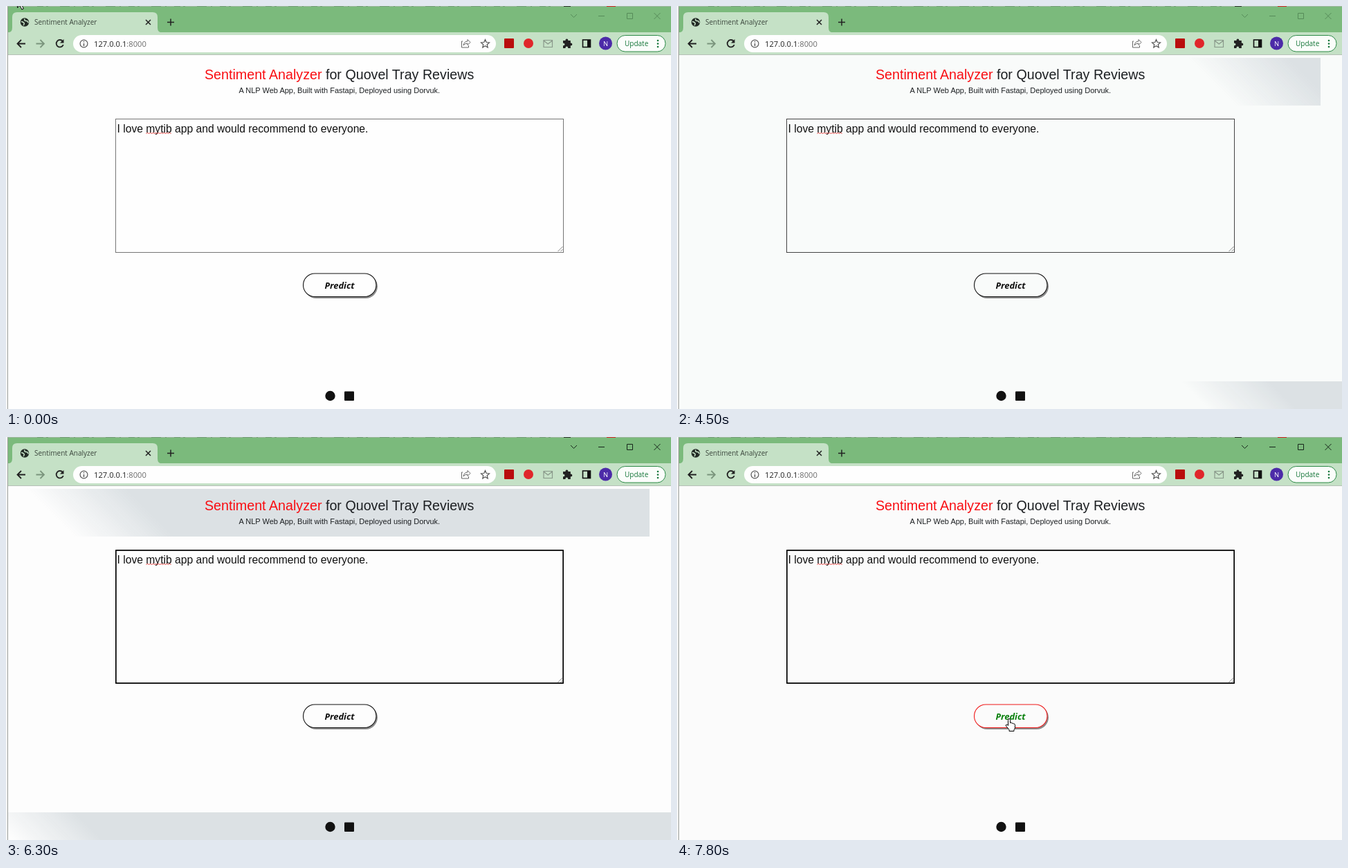
Recreate the animation shown at these times as an HTML page. Size 961 by 583 pixels, loop 8000 ms.

```html
<!DOCTYPE html>
<html lang="en">
<head>
<meta charset="utf-8">
<title>Sentiment Analyzer</title>
<style>
  html, body { margin: 0; width: 100%; height: 100%; overflow: hidden; background: #fefefe; }
  svg { display: block; width: 100%; height: 100%; }
  text { white-space: pre; }
  .page-text { font-family: "Liberation Sans", Arial, sans-serif; fill: #1c1f22; }
  .ui { font-family: "Open Sans", "Noto Sans", sans-serif; }
  .line { fill: none; stroke: #222; stroke-width: 1.2; }
  .thick { stroke-width: 1.8; }

  .page, .controls, .box, .focus, .sweep, .arrow, .idle, .hover {
    animation: 8s linear infinite;
  }

  .page { animation-name: tint; }
  @keyframes tint {
    0%, 33.7% { fill: #fefefe; }
    37.5% { fill: #fdfdfd; }
    47.5% { fill: #fcfdfd; }
    56.2%, 58% { fill: #f9fbfa; }
    62.5%, 75% { fill: #fdfdfd; }
    86.2% { fill: #fcfcfc; }
    97.5%, 100% { fill: #fbfbfb; }
  }

  /* Window gains focus */
  .controls { fill: none; stroke-width: 1; animation-name: activate; animation-timing-function: step-end; }
  @keyframes activate {
    0% { stroke: #568b59; }
    60%, 100% { stroke: #16251a; }
  }
  .focus { fill: none; stroke: #000; stroke-width: 1.7; animation-name: late; animation-timing-function: step-end; }
  @keyframes late {
    0% { opacity: 0; }
    60%, 100% { opacity: 1; }
  }

  .box { fill: none; animation-name: pulse; }
  @keyframes pulse {
    0%, 15% { stroke: #767676; }
    22.5%, 25% { stroke: #444; }
    31.2%, 47.5% { stroke: #767676; }
    56.2%, 100% { stroke: #444; }
  }

  /* Grey band slides in from the right and back out */
  .sweep { animation-name: sweep; animation-timing-function: ease; animation-delay: -4115ms; }
  .head { --out: 1213px; --in: 28px; }
  .foot { --out: 1232px; --in: -30px; }
  @keyframes sweep {
    0%, 62.5%, 100% { transform: translateX(var(--out)); }
    31.25% { transform: translateX(var(--in)); }
  }

  .arrow { animation-name: wander; }
  @keyframes wander {
    0%, 11.2% { transform: translate(16px, -14px); }
    12.5%, 32.5% { transform: translate(16px, -32px); }
    37.5%, 38.6% { transform: translate(53px, -11px); }
    43.7%, 99.9% { transform: translate(60px, -32px); }
    100% { transform: translate(16px, -14px); }
  }

  .idle { animation-name: hide; animation-timing-function: step-end; }
  .hover { animation-name: show; animation-timing-function: step-end; }
  @keyframes hide { 0% { opacity: 1; } 81.25%, 100% { opacity: 0; } }
  @keyframes show { 0% { opacity: 0; } 81.25%, 100% { opacity: 1; } }

  .button text { font: italic 700 13px "Open Sans", "Noto Sans", sans-serif; }
</style>
</head>
<body>
<svg viewBox="0 0 961 583">
  <defs>
    <linearGradient id="headFade" gradientUnits="userSpaceOnUse" x1="0" y1="75" x2="72" y2="3">
      <stop offset="0" stop-color="#dce1e4" stop-opacity="0"/>
      <stop offset="1" stop-color="#dce1e4"/>
    </linearGradient>
    <linearGradient id="footFade" gradientUnits="userSpaceOnUse" x1="0" y1="543" x2="64" y2="479">
      <stop offset="0" stop-color="#dce1e4" stop-opacity="0"/>
      <stop offset="1" stop-color="#dce1e4"/>
    </linearGradient>
    <clipPath id="headClip"><rect x="30" y="75" width="900" height="69"/></clipPath>
    <clipPath id="footClip"><rect x="3" y="543" width="958" height="40"/></clipPath>
  </defs>

  <rect class="page" width="961" height="583"/>

  <!-- Bands -->
  <g clip-path="url(#headClip)">
    <rect class="sweep head" y="75" width="1400" height="69" fill="url(#headFade)"/>
  </g>
  <g clip-path="url(#footClip)">
    <rect class="sweep foot" y="543" width="1400" height="40" fill="url(#footFade)"/>
  </g>

  <!-- Title bar and toolbar -->
  <rect x="2" width="959" height="39" fill="#7bba7c"/>
  <rect x="2" y="38" width="959" height="32" fill="#c5e1c6"/>
  <path d="M2 38.500q7 0 7-7V16q0-7 7-7H212q7 0 7 7V31.500q0 7 7 7V40H2z" fill="#c5e1c6"/>
  <path d="M2 70.500H961" stroke="#b5c0b6"/>
  <path d="M0 .5H961" stroke="#a3b8a4"/>
  <path d="M45 .5H790" stroke="#7d9f80" stroke-dasharray="9 4 3 17 14 6 2 11"/>
  <path d="M806 .5H816" stroke="#333"/>
  <path d="M868 .5H881" stroke="#d8262c"/>
  <rect width="2" height="583" fill="#f4f4f4"/>
  <path d="M2.500 1V583" stroke="#9b9f9b"/>

  <!-- Tab -->
  <circle cx="27" cy="23.500" r="6.200" fill="#222b25"/>
  <path d="M22 22.500q3 .5 4 2t-1 3.500M27 18.500q-1 3 2 3t3 3" fill="none" stroke="#c5e1c6" stroke-width="1.500"/>
  <text class="ui" x="41" y="27" font-size="10" fill="#3b463d">Sentiment Analyzer</text>
  <path class="line" d="M202 20l7 7m0-7l-7 7" style="stroke-width:1.5"/>
  <path class="line" d="M233 23.500h10m-5-5v10" style="stroke-width:1.5"/>

  <g class="controls">
    <path d="M816 12l4.500 4.500L825 12M856 14.500h9M897.500 10.500h8v8h-8zM936.500 10l9 9m0-9l-9 9"/>
  </g>

  <!-- Navigation -->
  <path class="line thick" d="M28 54.500H16.500m5.500-5.500l-5.500 5.500 5.500 5.500"/>
  <path class="line thick" d="M43.500 54.500H55m-5.500-5.500l5.500 5.500-5.500 5.500" style="stroke:#7b957d"/>
  <path class="line thick" d="M82 51a5.200 5.200 0 1 0 .8 5"/>
  <path d="M83.500 48v5.500H78z" fill="#222"/>
  <rect x="97" y="42" width="611" height="25" rx="12.500" fill="#fefefe"/>
  <circle class="line" cx="112.500" cy="54.500" r="5.400" style="stroke:#555"/>
  <path d="M112.500 51v1.500m0 1.500v4" stroke="#555" stroke-width="1.400"/>
  <text class="ui" x="127" y="58.500" font-size="11.200" fill="#222">127.0.0.1<tspan fill="#6a6a6a">:8000</tspan></text>
  <path class="line" d="M660 51h-1.500v9h10v-3M661 57q1-6 6-6v-2.500l4 4-4 4V54q-4 0-6 3z" style="stroke:#666;stroke-width:1"/>
  <path class="line" d="M692.500 48.500l1.700 4 4.300.4-3.300 2.800 1 4.300-3.700-2.300-3.700 2.300 1-4.300-3.300-2.800 4.300-.4z" style="stroke:#555"/>

  <!-- Extensions -->
  <rect x="720" y="47" width="14" height="14" rx="1" fill="#b90d0d"/>
  <circle cx="755" cy="54" r="7" fill="#e0262b"/>
  <path class="line" d="M777 49.500h12.500v10H777zM777 50l6.200 5 6.300-5" style="stroke:#89988a"/>
  <path d="M805 50h3.500v-.7a1.900 1.900 0 0 1 3.800 0V50h3.500v3.500h.6a1.900 1.900 0 0 1 0 3.800h-.6V61h-3.700v-.7a1.800 1.800 0 0 0-3.600 0V61H805v-3.700h.7a1.800 1.800 0 0 0 0-3.600H805z" fill="#222"/>
  <rect x="833.500" y="49" width="11" height="10.500" fill="none" stroke="#111" stroke-width="1.600"/>
  <rect x="840" y="49" width="5" height="10.500" fill="#111"/>
  <circle cx="866.500" cy="54" r="9.500" fill="#4c2ba8"/>
  <text class="ui" x="866.500" y="57.500" font-size="9.500" fill="#fff" text-anchor="middle">N</text>
  <rect x="883" y="42.500" width="70" height="23.500" rx="11.750" fill="#fbfdfb" stroke="#2c8a47"/>
  <text class="ui" x="894" y="58" font-size="10" font-weight="500" fill="#16763a">Update</text>
  <g fill="#16763a">
    <circle cx="942" cy="50" r="1.300"/><circle cx="942" cy="54.500" r="1.300"/><circle cx="942" cy="59" r="1.300"/>
  </g>

  <!-- Page -->
  <text class="page-text" x="287" y="105.500" font-size="19.680"><tspan fill="#f90d12">Sentiment Analyzer</tspan> for Quovel Tray Reviews</text>
  <text class="page-text" x="336.500" y="125.500" font-size="11">A NLP Web App, Built with Fastapi, Deployed using Dorvuk.</text>

  <rect class="box" x="158.500" y="163.500" width="647" height="193"/>
  <rect class="focus" x="158.850" y="163.850" width="646.300" height="192.300" rx="1"/>
  <path d="M797.500 355l7-7m-3 7l3-3" stroke="#777" stroke-width=".9"/>
  <text class="page-text" x="160.500" y="182.500" font-size="15.660" style="fill:#111">I love mytib app and would recommend to everyone.</text>
  <path d="M202.500 185l2-2 2 2 2-2 2 2 2-2 2 2 2-2 2 2 2-2 2 2 2-2 2 2 2-2 2 2 2-2 2 2 2-2 2 2" fill="none" stroke="#e8423f"/>

  <!-- Button -->
  <g class="button" text-anchor="middle">
    <rect x="431" y="388.500" width="106" height="34.500" rx="17.250" fill="#8b8b8b"/>
    <rect class="page" x="429.500" y="387" width="105.500" height="33.500" rx="16.750"/>
    <g class="idle">
      <rect x="429.500" y="387" width="105.500" height="33.500" rx="16.750" fill="none" stroke="#111" stroke-width="1.100"/>
      <text x="482" y="408.500" fill="#111">Predict</text>
    </g>
    <g class="hover">
      <rect x="429.500" y="387" width="105.500" height="33.500" rx="16.750" fill="none" stroke="#f01818" stroke-width="1.100"/>
      <text x="482" y="408.500" fill="#0a800d">Predict</text>
    </g>
  </g>

  <!-- Footer marks -->
  <circle cx="468.500" cy="564" r="7.200" fill="#111"/>
  <rect x="489" y="557.500" width="14" height="13.500" rx="1" fill="#111"/>

  <!-- Pointers -->
  <path class="arrow" d="M.5.5V16.500l3.700-3.500 2.600 6 2.500-1-2.600-6h5z" fill="#fff" stroke="#000"/>
  <path class="hover" d="M478.500 417v-7.500q0-2 1.500-2t1.500 2v4q2.300-.8 2.600.7 2-.6 2.400.8 2-.3 2 1.500v3.500q0 2-1.500 3.500v2h-7v-2l-4.500-5.500q-.8-1.500.5-2 1.300-.3 2.500 1.500z" fill="#fff" stroke="#000"/>
</svg>
</body>
</html>
```
